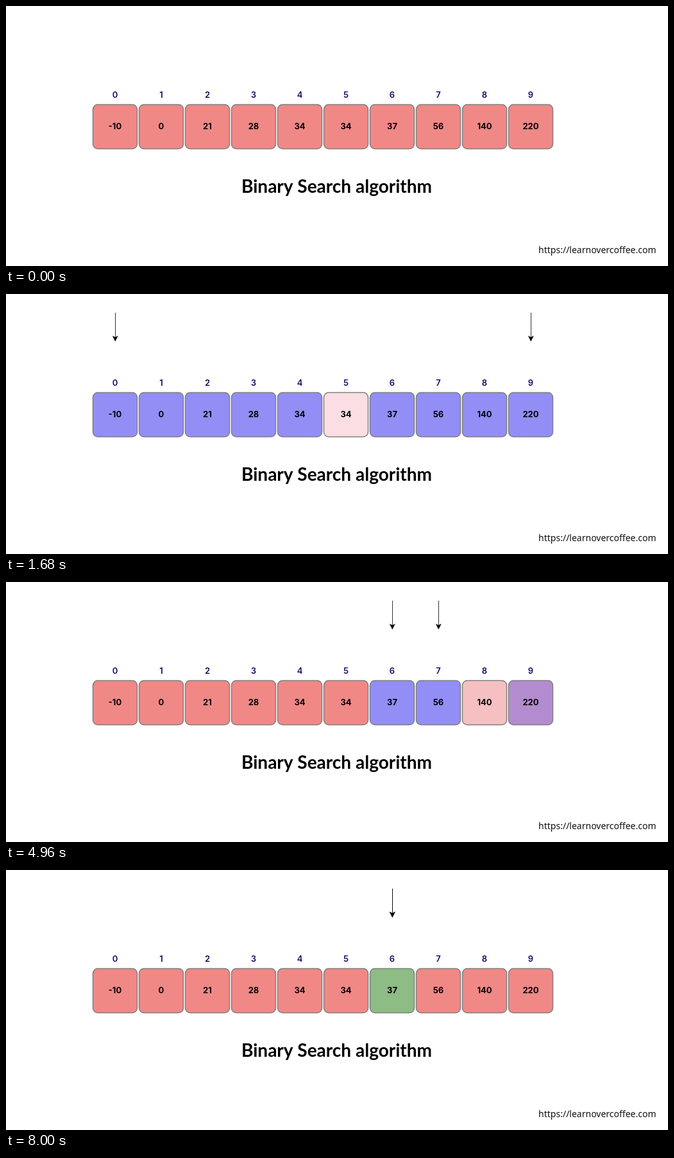
Write an HTML page with a canvas that moves like this. It is 1032x405 px and loops after 8.08 s.

```html
<!DOCTYPE html>
<html lang="en">
<head>
<meta charset="utf-8">
<title>Binary Search algorithm</title>
<style>
  html, body { margin: 0; width: 100%; height: 100%; overflow: hidden; background: #fff; }
  canvas { display: block; }
</style>
</head>
<body>
<canvas id="stage" width="1032" height="405"></canvas>
<script>
const ctx = document.getElementById('stage').getContext('2d');
const LOOP = 8080, TICK = 80, MOVE = 400, FADE = 200;
const values = [-10, 0, 21, 28, 34, 34, 37, 56, 140, 220];
const RED = [240, 136, 134], BLUE = [146, 142, 246];
const PINK = [250, 222, 228], GREEN = [141, 188, 132];

// Each fade recolours cells from..to, starting at the given time.
const fades = [
  { at: 1480, from: 0, to: 9, color: BLUE, mid: 5 },
  { at: 2880, from: 0, to: 5, color: RED },
  { at: 3480, from: 8, to: 8, color: PINK },
  { at: 4880, from: 8, to: 9, color: RED },
  { at: 5480, from: 7, to: 7, color: PINK },
  { at: 6880, from: 7, to: 7, color: RED },
  { at: 7480, from: 6, to: 6, color: GREEN }
];
const lowMoves = [{ at: 2480, to: 6 }];
const highMoves = [{ at: 4480, to: 7 }, { at: 6480, to: 6 }];

const progress = (t, start, span) => Math.min(1, Math.max(0, (t - start) / span));
const smooth = p => p * p * (3 - 2 * p);
const mix = (a, b, p) => a + (b - a) * p;
const cellX = i => 170 + 72 * i;

// CSS-like "ease": cubic-bezier(.25, .1, .25, 1)
function ease(x) {
  let lo = 0, hi = 1;
  for (let i = 0; i < 24; i++) {
    const s = (lo + hi) / 2, r = 1 - s;
    if (0.75 * r * r * s + 0.75 * r * s * s + s * s * s < x) lo = s;
    else hi = s;
  }
  const r = 1 - lo;
  return 0.3 * r * r * lo + 3 * r * lo * lo + lo * lo * lo;
}

function cellColor(i, t) {
  let color = RED;
  for (const f of fades) {
    if (t < f.at || i < f.from || i > f.to) continue;
    const goal = f.mid === i ? PINK : f.color;
    const p = smooth(progress(t, f.at, FADE));
    color = color.map((c, k) => mix(c, goal[k], p));
  }
  return `rgb(${color.map(Math.round).join(',')})`;
}

function pointerAt(start, moves, t) {
  return moves.reduce((pos, m) =>
    t < m.at ? pos : mix(pos, m.to, ease(progress(t, m.at, MOVE))), start);
}

function label(text, x, y, font, color, align = 'center') {
  ctx.font = font;
  ctx.fillStyle = color;
  ctx.textAlign = align;
  ctx.fillText(text, x, y);
}

function drawCell(i, t) {
  const x = cellX(i);
  ctx.beginPath();
  ctx.roundRect(x - 34.5, 153.5, 69, 69, 7.5);
  ctx.fillStyle = cellColor(i, t);
  ctx.fill();
  ctx.strokeStyle = '#808080';
  ctx.lineWidth = 1.5;
  ctx.stroke();
  label(i, x, 142.5, '600 13px Inter, sans-serif', '#140a64');
  label(values[i], x, 192.3, '700 13px Inter, sans-serif', '#000');
}

function drawArrow(pos, alpha) {
  ctx.save();
  ctx.translate(cellX(pos), 0);
  ctx.globalAlpha = alpha;
  ctx.fillStyle = '#000';
  ctx.fillRect(0.1, 29, 0.8, 38);
  ctx.beginPath();
  ctx.moveTo(0.3, 74);
  ctx.lineTo(-4.2, 65);
  ctx.lineTo(0.3, 67.2);
  ctx.lineTo(4.8, 65);
  ctx.fill();
  ctx.restore();
}

function draw(t) {
  ctx.fillStyle = '#fff';
  ctx.fillRect(0, 0, 1032, 405);
  values.forEach((_, i) => drawCell(i, t));
  const alpha = smooth(progress(t, 480, MOVE));
  if (alpha > 0) {
    drawArrow(pointerAt(0, lowMoves, t), alpha);
    drawArrow(pointerAt(9, highMoves, t), alpha);
  }
  label('Binary Search algorithm', 515.5, 290.5, '700 28px Lato, sans-serif', '#000');
  label('https://learnovercoffee.com', 1013.5, 385, '500 14px "Noto Sans", sans-serif', '#111', 'right');
}

const begin = performance.now();
function frame() {
  const t = (performance.now() - begin) % LOOP;
  draw(Math.floor(t / TICK) * TICK);
  requestAnimationFrame(frame);
}
frame();
</script>
</body>
</html>
```
